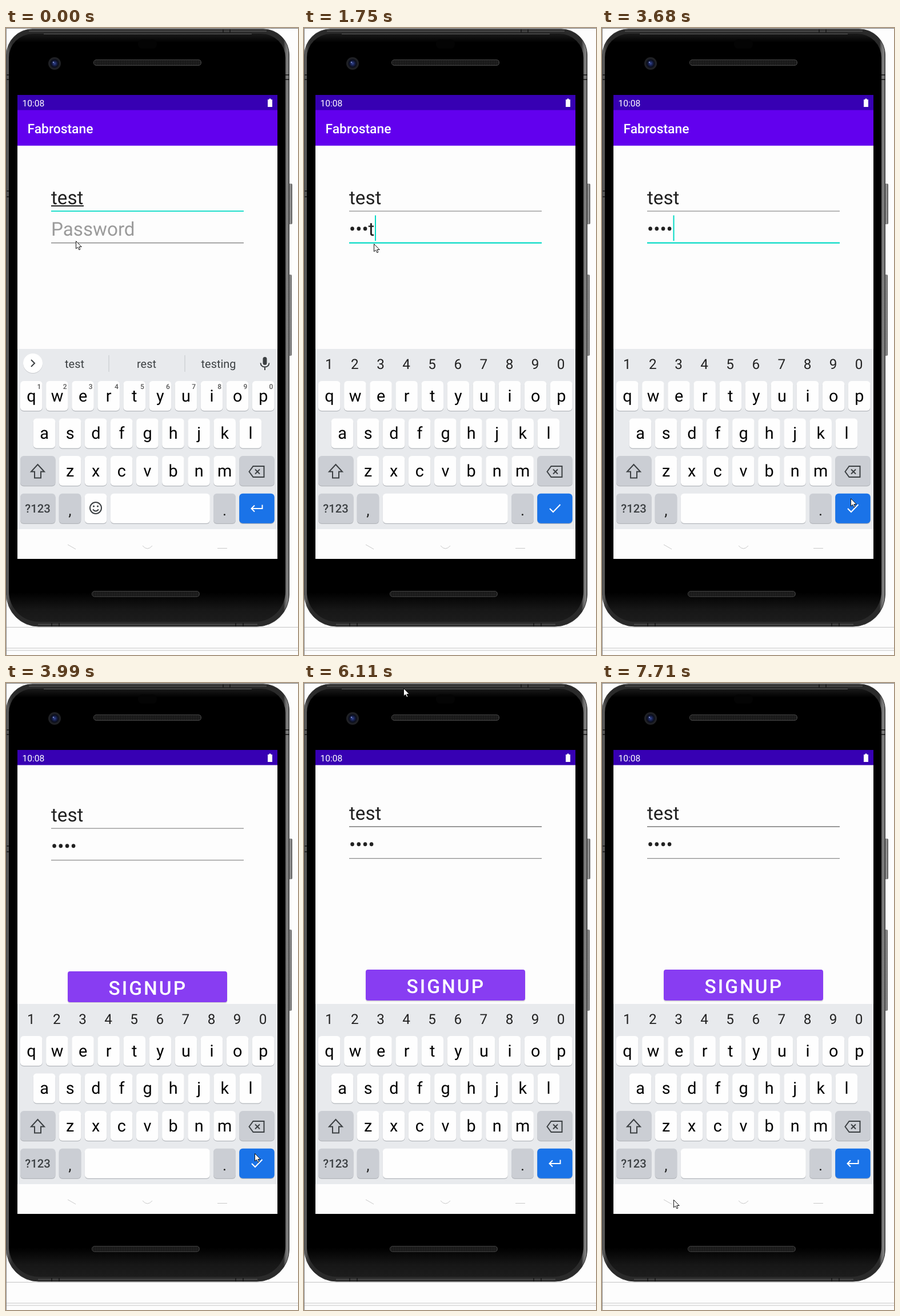
These frames come from a looping animation (511 by 1096 pixels, 8 s). An HTML page:

```html
<!DOCTYPE html>
<html lang="en">
<head>
<meta charset="utf-8">
<title>Phone login</title>
<style>
html, body { margin: 0; width: 100%; height: 100%; overflow: hidden; background: #fdfdfd; }
svg { display: block; width: 100vw; height: 100vh; }
text { font-family: Roboto, "Noto Sans", sans-serif; text-rendering: geometricPrecision; white-space: pre; }
.mid { text-anchor: middle; }
.medium { font-weight: 500; }
.field { font-size: 33.2px; fill: #212121; }
.key { font-size: 28.8px; fill: #000; }
.icon { fill: none; stroke: #3c4043; stroke-width: 2; }
.tick { fill: none; stroke: #fff; stroke-width: 2; }
</style>
</head>
<body>
<svg viewBox="0 0 511 1096" preserveAspectRatio="none">
  <defs>
    <linearGradient id="rim">
      <stop offset="0" stop-color="#333"/><stop offset=".004" stop-color="#707070"/>
      <stop offset=".008" stop-color="#444"/><stop offset=".02" stop-color="#2a2a2a"/>
      <stop offset=".98" stop-color="#2a2a2a"/><stop offset=".987" stop-color="#666"/>
      <stop offset=".995" stop-color="#858585"/><stop offset="1" stop-color="#444"/>
    </linearGradient>
    <linearGradient id="glass" x2="0" y2="1">
      <stop offset="0" stop-color="#1a1a1a"/><stop offset=".015" stop-color="#000"/>
      <stop offset=".95" stop-color="#000"/><stop offset=".98" stop-color="#171717"/>
      <stop offset="1" stop-color="#1c1c1c"/>
    </linearGradient>
    <linearGradient id="side">
      <stop offset="0" stop-color="#444"/><stop offset=".5" stop-color="#999"/><stop offset="1" stop-color="#555"/>
    </linearGradient>
    <radialGradient id="lens">
      <stop offset="0" stop-color="#3a4c98"/><stop offset=".35" stop-color="#1a2558"/>
      <stop offset=".75" stop-color="#0b0e1c"/><stop offset="1" stop-color="#1b1d24"/>
    </radialGradient>
    <pattern id="mesh" width="3" height="3" patternUnits="userSpaceOnUse">
      <rect width="3" height="3" fill="#141414"/><rect width="1.4" height="1.4" fill="#3a3a3a"/>
    </pattern>
    <clipPath id="app"><rect x="20" y="143" width="455" height="418"/></clipPath>
  </defs>

  <rect width="511" height="1096" fill="#fdfdfd"/>
  <path d="M0 .5H511" stroke="#777"/>
  <path d="M0 1047.5H511M0 1084H511M0 1088H511" stroke="#c4c4c4"/>
  <path d="M.5 0V1096" stroke="#8a8a8a"/>

  <g id="phone">
    <rect x="494" y="272" width="7" height="71" rx="2" fill="url(#side)"/>
    <rect x="494" y="431" width="6" height="142" rx="2" fill="url(#side)"/>
    <path d="M1 47A45 45 0 0 1 46 2H450.500A45 45 0 0 1 495.500 47V990A56 56 0 0 1 439.500 1046H57A56 56 0 0 1 1 990Z" fill="url(#rim)" stroke="#333"/>
    <path d="M40 5.500H456" stroke="#555" stroke-width="1.500"/>
    <path d="M56 1042.500H440" stroke="#505050" stroke-width="1.500"/>
    <path d="M5 52A42 42 0 0 1 47 10H447A42 42 0 0 1 489 52V985A53 53 0 0 1 436 1038H58A53 53 0 0 1 5 985Z" fill="url(#glass)"/>
    <path d="M66 10.500H430" stroke="#5a5a5a"/>
    <path d="M1 82H5M1 90H5M1 285H5M1 295H5M489 82H496M489 90H496M380 2V8M392 2V8M80 1040V1046M93 1040V1046M402 1040V1046M415 1040V1046" stroke="#151515" stroke-width="1.500"/>
    <rect x="231" y="20" width="33" height="16" rx="7" fill="#040404"/>
    <circle cx="85" cy="62" r="11" fill="#202125"/>
    <circle cx="85" cy="62" r="8.500" fill="url(#lens)"/>
    <circle cx="83" cy="60" r="1.200" fill="#7c8cc8"/>
    <rect x="153.500" y="55.500" width="188" height="10" rx="4.500" fill="url(#mesh)" stroke="#444"/>
    <rect x="150.500" y="984.500" width="188" height="9.500" rx="4.500" fill="url(#mesh)" stroke="#444"/>
  </g>

  <rect x="20" y="117" width="455" height="811" fill="#fdfdfd"/>

  <g clip-path="url(#app)">
    <g id="page">
      <rect x="20" y="143" width="455" height="62.700" fill="#6200ee"/>
      <text class="medium" x="37.500" y="183.500" font-size="22.900" fill="#fff">Fabrostane</text>

      <text class="field" x="79" y="307.600">test</text>
      <path id="compose" d="M79 311H136" stroke="#212121" stroke-width="1.800"/>
      <path id="userLine" d="M79 320.200H416"/>
      <path id="userCaret" d="M136.500 272V318" stroke="#03dac5" stroke-width="2"/>

      <g id="secret"></g>
      <path id="passLine" d="M79 375.600H416"/>
      <path id="caret" d="M0 327.500V372" stroke="#03dac5" stroke-width="2"/>

      <g>
        <rect x="107.500" y="571" width="280" height="55.500" rx="4.500" fill="#000" opacity=".08"/>
        <rect x="108" y="571" width="279" height="54" rx="4" fill="#000" opacity=".1"/>
        <rect x="108" y="570" width="279" height="54" rx="4" fill="#883df2"/>
        <text class="medium" x="179.500" y="611" font-size="33.500" letter-spacing="3" fill="#fff">SIGNUP</text>
      </g>
    </g>
  </g>

  <rect x="20" y="117" width="455" height="26.500" fill="#3700b3"/>
  <text x="28.500" y="136.500" font-size="15.600" fill="#fff">10:08</text>
  <path d="M460.500 123.500h3v1.500h2.500v13h-8v-13h2.500z" fill="#fff"/>

  <rect x="20" y="561" width="455" height="315" fill="#e8eaed"/>
  <g id="keys"></g>
  <path d="M108 903L122 911M239 905Q247.500 915 256 905M370 909.500H387" fill="none" stroke="#c9c9c9"/>

  <g id="pointer">
    <path d="M.5 .5V13.800L3.600 11.200L5.900 15.800L7.900 14.900L5.800 10.500H10.200Z" fill="#fff" stroke="#111"/>
  </g>
</svg>

<script>
const LOOP = 8000;
const $ = id => document.getElementById(id);
const sheet = document.head.appendChild(document.createElement("style"));

// Stepped timeline: each [ms, css] holds until the next one
function track(id, steps) {
  const frames = steps.map(([ms, css]) => `${ms / LOOP * 100}% {${css}}`).join(" ");
  sheet.append(`@keyframes ${id} {${frames} 100% {${steps.at(-1)[1]}}}
#${id} {animation: ${id} ${LOOP}ms step-end infinite}\n`);
}

function show(id, from, to) {
  const steps = from ? [[0, "opacity:0"], [from, "opacity:1"]] : [[0, "opacity:1"]];
  if (to < LOOP) steps.push([to, "opacity:0"]);
  track(id, steps);
}

const label = (x, y, s, size, extra = "") =>
  `<text class="mid" x="${x}" y="${y}" font-size="${size}" ${extra}>${s}</text>`;

const cap = (x, y, w, fill = "#fefefe") =>
  `<rect x="${x}" y="${y + 1.2}" width="${w}" height="52" rx="6" fill="#b4b7bc"/>
   <rect x="${x}" y="${y}" width="${w}" height="52" rx="6" fill="${fill}"/>`;

const PITCH = 45.1, GREY = "#cbced4";
const row = (letters, x, y) => [...letters].map((c, i) =>
  cap(x + i * PITCH, y, 38.6) +
  `<text class="mid key" x="${x + i * PITCH + 19.4}" y="${y + 35.5}">${c}</text>`).join("");
const digits = draw => [..."1234567890"].map((d, i) => draw(d, 25 + i * PITCH)).join("");

$("keys").innerHTML =
  row("qwertyuiop", 25, 617) + row("asdfghjkl", 47.7, 682.5) + row("zxcvbnm", 92.7, 748) +
  cap(25, 748, 61.5, GREY) + cap(408.2, 748, 61.5, GREY) +
  cap(25, 813.7, 61.5, GREY) + cap(92.7, 813.7, 38.6, GREY) +
  cap(363, 813.7, 39, GREY) + cap(408.2, 813.7, 61.5, "#1a73e8") +
  label(55.5, 846.5, "?123", 20.3, 'fill="#3c4043" font-weight="500"') +
  label(112, 852, ",", 27, 'fill="#222"') + label(382.5, 852, ".", 27, 'fill="#222"') +
  `<path class="icon" d="M55.500 763L67 775.500H61V786.500H50V775.500H44Z"/>
   <path class="icon" d="M425.500 775.500L432.500 766H451.500V785H432.500ZM436 771.500L444 779.500M444 771.500L436 779.500"/>
   <g id="textKeys">
     <circle cx="47" cy="587" r="17" fill="#c6c8cc"/><circle cx="47" cy="586" r="17" fill="#fff"/>
     <path class="icon" d="M44 580L50 586L44 592"/>
     ${label(120, 594, "test", 19.9, 'fill="#3c4043"')}
     ${label(246, 594, "rest", 19.9, 'fill="#3c4043"')}
     ${label(372, 594, "testing", 19.9, 'fill="#3c4043"')}
     <path d="M180 572V601M313 572V601" stroke="#c3c6ca"/>
     <rect x="449.500" y="575" width="7" height="14" rx="3.500" fill="#3c4043"/>
     <path class="icon" d="M445.500 585.500Q446 592.500 453 592.500Q460 592.500 460.500 585.500M453 592.500V598"/>
     ${digits((d, x) => label(x + 33, 630.5, d, 12, 'fill="#555" font-weight="500"'))}
     ${cap(137.8, 813.7, 38.6)}${cap(182.9, 813.7, 174)}
     <circle class="icon" cx="157" cy="839" r="10"/>
     <path class="icon" d="M152 841.500Q157 847.500 162 841.500"/>
     <circle cx="153.500" cy="836" r="1.600" fill="#3c4043"/><circle cx="160.500" cy="836" r="1.600" fill="#3c4043"/>
   </g>
   <g id="passKeys">
     ${digits((d, x) => label(x + 18.8, 595.5, d, 24.3, 'fill="#222"'))}
     ${cap(137.8, 813.7, 219)}
   </g>
   <path id="enter" class="tick" d="M448.500 833.500V840H430M435 834.500L429.500 840L435 845.500"/>
   <path id="check" class="tick" d="M430 840L436 846L448.500 833"/>`;

// Password entry
const entry = [[0, "Password"], [1080, "t"], [1360, "•e"], [1630, "••s"], [1750, "•••t"], [3130, "••••"]];
$("secret").innerHTML = entry.map(([, s], i) =>
  `<text id="pw${i}" class="field" x="79" y="363"${i ? "" : ' style="fill:#9b9b9b"'}>${s}</text>`).join("");
entry.forEach(([ms], i) => show("pw" + i, ms, entry[i + 1]?.[0] ?? LOOP));

const caretAt = (x, on) => `transform:translateX(${x}px);opacity:${on}`;
track("caret", [
  [0, caretAt(80, 0)], [540, caretAt(80, 1)], [1080, caretAt(91, 1)], [1360, caretAt(109, 1)],
  [1630, caretAt(119, 1)], [1750, caretAt(125, 1)], [2310, caretAt(125, 0)], [2740, caretAt(125, 1)],
  [3250, caretAt(125.5, 0)], [3680, caretAt(125.5, 1)], [3990, caretAt(125.5, 0)]
]);
show("userCaret", 420, 690);
show("compose", 0, 690);

const line = (color, width) => `stroke:${color};stroke-width:${width}px`;
const idle = line("#8c8c8c", 1.2), teal = "#03dac5";
track("userLine", [[0, line(teal, 1.8)], [540, idle], [4260, line("#5c5c5c", 1.3)]]);
track("passLine", [[0, line("#777", 1.3)], [540, line(teal, 2.4)], [3990, idle]]);

// Keyboard layouts and page pan
show("textKeys", 0, 690);
show("passKeys", 690, LOOP);
track("enter", [[0, "opacity:1"], [690, "opacity:0"], [4260, "opacity:1"]]);
track("check", [[0, "opacity:0"], [690, "opacity:1"], [4260, "opacity:0"]]);

const move = (x, y) => `transform:translate(${x}px,${y}px)`;
track("page", [[0, move(0, 0)], [3990, move(0, -66)], [4110, move(0, -68)], [4260, move(0, -69)]]);

track("pointer", [
  [0, 122, 372], [150, 122, 377], [2310, 346, 603], [2460, 433, 633],
  [2740, 438, 690], [2860, 439, 740], [2980, 439, 779], [3130, 437, 797], [3250, 435, 812], [3400, 435, 822],
  [4260, 330, 690], [4380, 203, 520], [4690, 204, 520], [4840, 245, 519],
  [4990, 387, 473], [5110, 380, 478], [5230, 355, 486], [5350, 318, 495], [5470, 282, 503],
  [5620, 226, 155], [5870, 205, 90], [5990, 185, 30], [6110, 174, 9], [6380, 182, 60], [6500, 198, 174],
  [6650, 152, 400], [6770, 155, 541], [6920, 146, 640], [7040, 137, 780], [7160, 131, 873],
  [7440, 125, 881], [7590, 125, 892], [7710, 125, 903]
].map(([ms, x, y]) => [ms, move(x, y)]));
</script>
</body>
</html>
```
